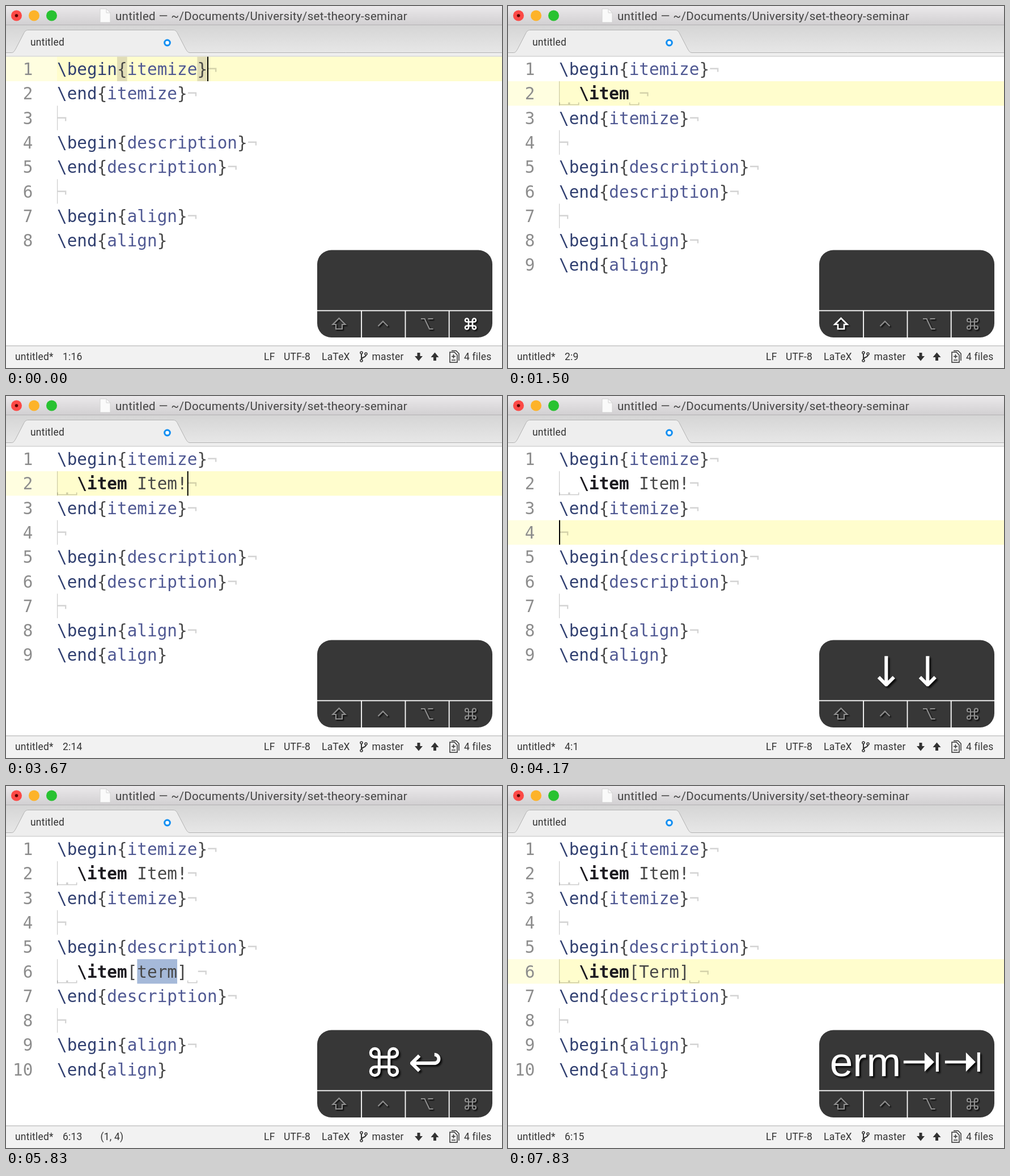
An HTML page with a canvas that plays this animation: 875x640 px, repeating every 8000 ms.

```html
<!DOCTYPE html>
<html lang="en">
<head>
<meta charset="utf-8">
<title>LaTeX item snippets</title>
<style>
  html, body { margin: 0; width: 100%; height: 100%; overflow: hidden; background: #fff; }
  canvas { display: block; }
</style>
</head>
<body>
<canvas id="stage" width="875" height="640"></canvas>
<script>
const ctx = document.getElementById('stage').getContext('2d');
const MONO = '"DejaVu Sans Mono", monospace';
const UI = 'Roboto, sans-serif';
const CODE_SIZE = 29.35, CELL = 17.67, LEFT = 90, TOP = 89.7, ROW = 43.3;
const TICKS_PER_SECOND = 6, LOOP_TICKS = 48;
const MODIFIERS = ['⇧', '^', '⌥', '⌘'];
const MODIFIER_X = [587.5, 665, 742.5, 819.5];

// Each step changes part of the state; the first number is a time in ticks.
const steps = [
  [0, { pos: [1, 16], mods: '⌘', keys: '', item: null, desc: null }],
  [2, { pos: [2, 9], keys: '⌘↩', item: '  \\item ' }],
  [4, { mods: '' }],
  [8, { keys: '' }],
  [9, { mods: '⇧' }],
  [10, { pos: [2, 11], mods: '', keys: 't', item: '  \\item It' }],
  [11, { pos: [2, 13], keys: 'tem', item: '  \\item Item', popup: true }],
  [15, { mods: '⇧', keys: '' }],
  [16, { pos: [2, 14], keys: '!', item: '  \\item Item!', popup: false }],
  [17, { mods: '' }],
  [21, { keys: '' }],
  [24, { pos: [3, 14], keys: '↓' }],
  [25, { pos: [4, 1], keys: '↓↓' }],
  [26, { pos: [5, 14], keys: '↓↓↓' }],
  [27, { mods: '^' }],
  [28, { pos: [5, 20], keys: '^E' }],
  [29, { mods: '' }],
  [30, { mods: '⌘', keys: '' }],
  [31, { pos: [6, 13], keys: '⌘↩', desc: '  \\item[term] ', selected: true }],
  [33, { mods: '' }],
  [35, { mods: '⇧', keys: '' }],
  [37, { pos: [6, 10], keys: 'T', desc: '  \\item[T] ', selected: false }],
  [38, { pos: [6, 11], mods: '', keys: 'e', desc: '  \\item[Te] ' }],
  [39, { pos: [6, 12], keys: 'er', desc: '  \\item[Ter] ' }],
  [40, { pos: [6, 13], keys: 'erm', desc: '  \\item[Term] ' }],
  [43, { pos: [6, 15], keys: 'erm⇥' }],
  [45, { keys: 'erm⇥⇥' }]
];

function stateAt(tick) {
  const state = {};
  for (const [time, change] of steps) {
    if (time > tick) break;
    Object.assign(state, change);
    if (change.pos) state.moved = time;
  }
  return state;
}

function rect(x, y, w, h, color) {
  ctx.fillStyle = color;
  ctx.fillRect(x, y, w, h);
}

function text(str, x, y, size, color, family = UI, weight = 400, spacing = 0) {
  ctx.font = `${weight} ${size}px ${family}`;
  ctx.letterSpacing = spacing + 'px';
  ctx.fillStyle = color;
  ctx.fillText(str, x, y);
  ctx.letterSpacing = '0px';
}

const code = (str, x, y, color, weight = 400, size = CODE_SIZE) =>
  text(str, x, y, size, color, MONO, weight);
const label = (str, x, y) => text(str, x, y, 17.5, '#333', UI, 400, 0.2);

function stroke(d, color, width) {
  ctx.strokeStyle = color;
  ctx.lineWidth = width;
  ctx.stroke(new Path2D(d));
}

function fill(d, color) {
  ctx.fillStyle = color;
  ctx.fill(new Path2D(d));
}

function disc(x, y, r, color) {
  ctx.beginPath();
  ctx.arc(x, y, r, 0, 7);
  ctx.fillStyle = color;
  ctx.fill();
}

function ring(x, y, r, color, width) {
  ctx.beginPath();
  ctx.arc(x, y, r, 0, 7);
  ctx.strokeStyle = color;
  ctx.lineWidth = width;
  ctx.stroke();
}

function verticalGradient(y, h, from, to) {
  const g = ctx.createLinearGradient(0, y, 0, y + h);
  g.addColorStop(0, from);
  g.addColorStop(1, to);
  rect(0, y, 875, h, g);
}

function shadow(offset, blur, color = 'rgba(0,0,0,.8)') {
  ctx.shadowOffsetX = ctx.shadowOffsetY = offset;
  ctx.shadowBlur = blur;
  ctx.shadowColor = color;
}

const noShadow = () => shadow(0, 0, 'transparent');

function drawWindow() {
  rect(0, 0, 875, 640, '#fff');
  verticalGradient(0, 33, '#ebe9eb', '#d2d0d2');
  rect(0, 33, 875, 1, '#b3b1b3');
  disc(18.5, 17, 9.5, '#fc4946');
  disc(18.5, 17, 2.8, '#5b0502');
  disc(49.5, 17, 9.5, '#fdb32a');
  disc(80.5, 17, 9.5, '#28c231');
  fill('M166 5H177L184 12V29H166Z', '#fafafa');
  stroke('M166 5H177L184 12V29H166ZM177 5V12H184', '#d2d2d2', 1);
  text('untitled — ~/Documents/University/set-theory-seminar', 193, 24.5, 20.5, '#444', UI, 400, 0.32);

  verticalGradient(34, 49, '#d5d5d5', '#e7e7e7');
  rect(0, 83, 875, 6, '#eee');
  const tab = 'M10 82.5C14 82 15 79 17 76L31 49C33 45 35 42.5 39 42.5H295C299 42.5 301 45 303 49L317 76C319 79 320 82 324 82.5';
  fill(tab + 'V84H10Z', '#eee');
  stroke('M0 82.5H10' + tab.slice(6).replace(/^/, '') + 'H875', '#b2b2b2', 1);
  rect(0, 88.5, 875, 1, '#c4c4c4');
  label('untitled', 43, 69.5);
  disc(284.5, 65, 6, '#fff');
  ring(284.5, 65, 4.8, '#1590f2', 3.2);
}

function drawStatus({ pos, selected }) {
  rect(0, 600, 875, 40, '#f2f2f2');
  rect(0, 600, 875, 1.5, '#c5c5c5');
  label('untitled*', 16, 626);
  label(pos.join(':'), 100, 626);
  if (selected) label('(1, 4)', 166.5, 626);
  label('LF', 455, 626);
  label('UTF-8', 490, 626);
  label('LaTeX', 557, 626);
  label('master', 645.5, 626);
  label('4 files', 808, 626);

  stroke('M627 615V625M635 617C635 622 627 620 627 625', '#333', 2);
  for (const [x, y] of [[627, 613], [635, 615], [627, 627]]) ring(x, y, 2, '#333', 1.6);
  fill('M725.5 613H730.5V619H735L728 627.5L721 619H725.5Z', '#333');
  fill('M754 627H759V621H763.5L756.5 612.5L749.5 621H754Z', '#333');
  stroke('M783 612H791L796 617V630H783ZM786 609.5H794L799 614.5V627M789.5 616V623M786 619.5H793M786 626H793', '#333', 1.5);
}

function documentLines({ item, desc }) {
  const block = (name, body) =>
    [`\\begin{${name}}`, ...(body ? [body] : []), `\\end{${name}}`];
  return [...block('itemize', item), '', ...block('description', desc), '', ...block('align')];
}

function spaceMark(x, y) {
  stroke(`M${x + 1} ${y + 37.5}V${y + 41.5}H${x + 17}V${y + 37.5}`, 'rgba(0,0,0,.2)', 1.6);
}

function drawLine(line, index, isLast) {
  const y = TOP + index * ROW, baseline = y + 32.3;
  const number = String(index + 1);
  code(number, 47.3 - number.length * CELL, baseline, '#8d8d8d');

  if (line === '' || line[0] === ' ') rect(LEFT, y, 1.2, ROW, 'rgba(0,0,0,.2)');
  for (let col = 0; line[col] === ' '; col++) spaceMark(LEFT + col * CELL, y);
  if (line.endsWith(' ')) spaceMark(LEFT + (line.length - 1) * CELL, y);

  for (const token of line.matchAll(/\\item|\\\w+|(?<=\{)\w+|[^\\]/g)) {
    const word = token[0];
    const isItem = word === '\\item';
    const color = isItem ? '#1c1a20'
      : word[0] === '\\' ? '#303f70'
      : line[token.index - 1] === '{' ? '#505993' : '#474747';
    code(word, LEFT + token.index * CELL, baseline, color, isItem ? 700 : 400);
  }
  if (!isLast) code('¬', LEFT + line.length * CELL, baseline, 'rgba(0,0,0,.17)');
}

function drawEditor(state, tick) {
  const lines = documentLines(state);
  const [row, col] = state.pos;
  const y = TOP + (row - 1) * ROW;
  const current = lines[row - 1];
  const columnBox = (index, count, color) =>
    rect(LEFT + index * CELL, y, count * CELL, ROW, color);

  if (state.selected) {
    columnBox(8, 4, '#a5b9d9');
  } else {
    rect(0, y, LEFT, ROW, '#fffee0');
    rect(LEFT, y, 875 - LEFT, ROW, '#fffdcd');
    if (current[col - 2] === '}' || current[col - 1] === ']') {
      for (const bracket of [/[{[]/, /[}\]]/]) columnBox(current.search(bracket), 1, '#e1ddb6');
    }
  }

  lines.forEach((line, i) => drawLine(line, i, i === lines.length - 1));

  // The caret stays on for a moment after a move, then blinks.
  const idle = (tick - state.moved) / TICKS_PER_SECOND - 0.3;
  if (idle < 0 || Math.floor(idle / 0.4) % 2) rect(LEFT + (col - 1) * CELL, y, 2, ROW, '#000');
}

function drawPopup() {
  ctx.save();
  ctx.beginPath();
  ctx.roundRect(151, 177, 375.5, 177.5, 3);
  shadow(2, 7, 'rgba(0,0,0,.35)');
  ctx.fillStyle = '#e8e8e8';
  ctx.fill();
  noShadow();
  ctx.save();
  ctx.clip();
  rect(151, 177, 376, 59.5, '#5b98e8');
  rect(151, 177, 59.5, 59.5, '#4591cd');
  rect(151, 295, 59.5, 60, '#afcfd0');
  ctx.restore();
  ctx.strokeStyle = '#969696';
  ctx.lineWidth = 1.2;
  ctx.stroke();
  ctx.restore();

  fill('M166 206.5H177V201L187 209L177 217V211.5H166ZM191.5 200H196V218H191.5Z', '#0b918b');
  code('v', 173, 332, '#0c807c', 700, 25);
  const end = 232 + 4 * CELL;
  code('item', 232, 217.8, '#fff', 700);
  code('ize', end, 217.8, '#dce9fb');
  code('itemize', 387.5, 216.5, '#a7c5f0', 400, 26);
  code('item', 232, 276.5, '#000', 700);
  code('item', 232, 335.5, '#000', 700);
  code('ize', end, 335.5, '#444');
}

const glyphs = {
  '⇧': 'M0 -10L11 1H5.5V9H-5.5V1H-11Z',
  '^': 'M-8.5 4L0 -4.5L8.5 4',
  '⌥': 'M-10.5 -9H-4L4.5 9H11M2 -9H11',
  '⌘': 'M-3.5 -3.5H3.5V3.5H-3.5ZM-3.5 -3.5H-6.5A3 3 0 1 1 -3.5 -6.5ZM3.5 -3.5V-6.5A3 3 0 1 1 6.5 -3.5ZM3.5 3.5H6.5A3 3 0 1 1 3.5 6.5ZM-3.5 3.5V6.5A3 3 0 1 1 -6.5 3.5Z'
};

function glyph(name, x, y, color, scale = 1, width = 2.4) {
  ctx.save();
  ctx.translate(x, y);
  ctx.scale(scale, scale);
  stroke(glyphs[name], color, width);
  ctx.restore();
}

function drawKeys(keys) {
  const size = 73, family = '"Liberation Sans", Arial, sans-serif';
  ctx.font = `${size}px ${family}`;
  const widths = [...keys].map(key =>
    key === '^' ? 65 : /[⌘↩↓⇥]/.test(key) ? 73 : ctx.measureText(key).width);
  let x = 703.5 - widths.reduce((sum, w) => sum + w, 0) / 2;
  shadow(3, 3);
  [...keys].forEach((key, i) => {
    const middle = x + widths[i] / 2;
    if (key === '^') glyph(key, middle + 3.5, 473, '#fff', 2.45, 2.4);
    else if (key === '⌘') glyph(key, middle, 488, '#fff', 2.5, 2);
    else if (key === '⇥') {
      const a = middle - 32;
      fill(`M${a} 485.5H${a + 37}V471L${a + 54} 488L${a + 37} 505V490.5H${a}ZM${a + 57} 471H${a + 62}V505H${a + 57}Z`, '#fff');
    } else if (/[↩↓]/.test(key)) text(key, x + 6, 513, size, '#fff', '"DejaVu Sans", sans-serif');
    else text(key, x, 513, size, '#fff', family);
    x += widths[i];
  });
  noShadow();
}

function drawKeyPanel({ keys, mods }) {
  ctx.beginPath();
  ctx.roundRect(549, 431.5, 309, 154.5, 25);
  ctx.fillStyle = '#373737';
  ctx.fill();
  rect(549, 537.7, 309, 1.8, '#fff');
  for (const x of [626.2, 703.6, 780.8]) rect(x, 538, 1.8, 48, '#fff');
  shadow(2, 2);
  MODIFIERS.forEach((name, i) => {
    const active = mods === name;
    glyph(name, MODIFIER_X[i], 562, active ? '#fff' : '#8e8e8e', 1, active ? 2.7 : 2.2);
  });
  noShadow();
  drawKeys(keys);
}

function draw(now) {
  const tick = Math.floor(now / 1000 * TICKS_PER_SECOND) % LOOP_TICKS;
  const state = stateAt(tick);
  drawWindow();
  drawEditor(state, tick);
  if (state.popup) drawPopup();
  drawStatus(state);
  drawKeyPanel(state);
}

let start;
function loop(now) {
  start ??= now;
  draw(now - start);
  requestAnimationFrame(loop);
}
requestAnimationFrame(loop);
</script>
</body>
</html>
```
